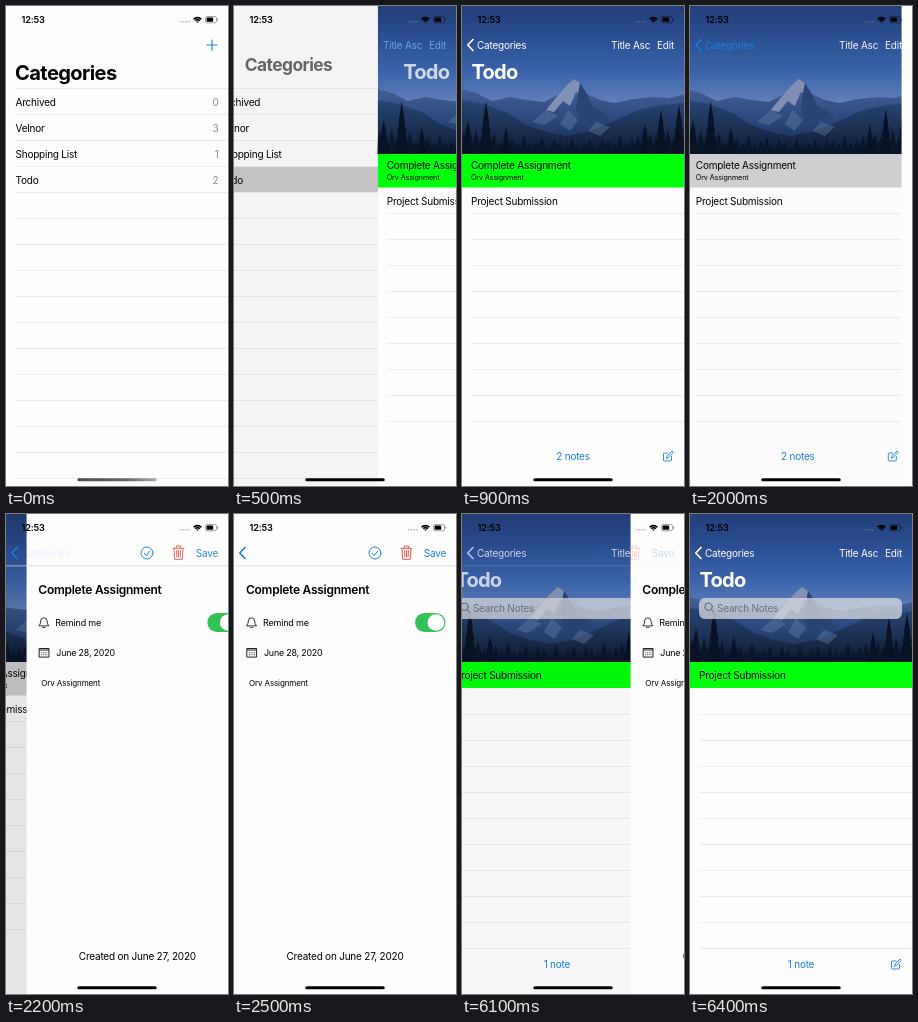
An HTML page with a canvas that plays this animation: 222 by 480 pixels, repeating every 8000 ms.

```html
<!DOCTYPE html>
<html lang="en">
<head>
<meta charset="utf-8">
<title>Notes app</title>
<style>
html, body { margin: 0; width: 100%; height: 100%; overflow: hidden; background: #fdfdfd; }
canvas { display: block; width: 222px; height: 480px; }
</style>
</head>
<body>
<canvas id="stage"></canvas>
<script>
const W = 222, H = 480, LOOP = 8000;
const BLUE = '#1a7ee0', PAPER = '#fdfdfd', LINE = '#ececee', GREEN = '#00ff0a';
const canvas = document.getElementById('stage');
const ctx = canvas.getContext('2d');
const ratio = window.devicePixelRatio || 1;
canvas.width = W * ratio;
canvas.height = H * ratio;
ctx.scale(ratio, ratio);

// Text is placed by the vertical centre of its capitals.
function text(str, x, y, { size = 10, weight = 400, color = '#000', align = 'left', track = -0.022 } = {}) {
  ctx.font = `${weight} ${size}px Inter, "Liberation Sans", sans-serif`;
  ctx.letterSpacing = `${size * track}px`;
  ctx.textAlign = align;
  ctx.fillStyle = color;
  ctx.fillText(str, x, y + size * 0.36);
}

function rect(x, y, w, h, color) {
  ctx.fillStyle = color;
  ctx.fillRect(x, y, w, h);
}

function pill(x, y, w, h, r, color) {
  ctx.fillStyle = color;
  ctx.beginPath();
  ctx.roundRect(x, y, w, h, r);
  ctx.fill();
}

function stroke(d, color, width = 1) {
  ctx.strokeStyle = color;
  ctx.lineWidth = width;
  ctx.lineCap = ctx.lineJoin = 'round';
  ctx.stroke(new Path2D(d));
}

function shape(d, color) {
  ctx.fillStyle = color;
  ctx.fill(new Path2D(d));
}

function verticalFade(y0, y1, ...stops) {
  const gradient = ctx.createLinearGradient(0, y0, 0, y1);
  stops.forEach((color, i) => gradient.addColorStop(i / (stops.length - 1), color));
  return gradient;
}

function faded(alpha, draw) {
  if (alpha <= 0) return;
  ctx.save();
  ctx.globalAlpha *= Math.min(1, alpha);
  draw();
  ctx.restore();
}

function shifted(x, draw) {
  ctx.save();
  ctx.translate(x, 0);
  ctx.beginPath();
  ctx.rect(0, 0, W, H);
  ctx.clip();
  draw();
  ctx.restore();
}

function rules(first, last) {
  for (let y = first; y <= last; y += 26) rect(9, y, W - 9, 1, LINE);
}

// Progress of a critically damped spring.
function spring(ms) {
  const k = 18.26 * Math.max(0, ms) / 1000;
  return 1 - (1 + k) * Math.exp(-k);
}

function statusBar() {
  text('12:53', 15.5, 14, { size: 9.2, weight: 600, track: -0.02 });
  for (let i = 0; i < 4; i++) rect(174 + i * 2.8, 15, 1.5, 1.5, 'rgba(130,130,130,.55)');
  for (const r of [1, 3.2, 5.4]) {
    ctx.beginPath();
    ctx.arc(191.5, 17, r, -Math.PI * 0.76, -Math.PI * 0.24);
    ctx.strokeStyle = '#000';
    ctx.lineWidth = 1.6;
    ctx.lineCap = 'butt';
    ctx.stroke();
  }
  ctx.beginPath();
  ctx.roundRect(199.5, 10.5, 11, 6.4, 1.8);
  ctx.strokeStyle = 'rgba(0,0,0,.45)';
  ctx.lineWidth = 0.8;
  ctx.stroke();
  pill(200.6, 11.6, 6.6, 4.2, 0.9, '#000');
  rect(211.4, 12.7, 0.9, 2, 'rgba(0,0,0,.45)');
}

function homeBar(soft) {
  let color = '#000';
  if (soft) {
    color = ctx.createLinearGradient(71, 0, 151, 0);
    color.addColorStop(0, '#4a4a4a');
    color.addColorStop(0.6, '#666');
    color.addColorStop(1, '#aaa');
  }
  pill(71.3, 472.2, 79.4, 3, 1.5, color);
}

function categoryBody(selected) {
  rect(0, 0, W, H, PAPER);
  if (selected) rect(0, 161, W, 26, '#cacacc');
  rules(82, 472);
  [['Archived', 0], ['Velnor', 3], ['Shopping List', 1], ['Todo', 2]].forEach(([name, count], i) => {
    const y = 96 + i * 26;
    text(name, 9.5, y);
    text(count, 212.5, y, { color: '#8e8e93', align: 'right' });
  });
}

function fir(x, top, width) {
  const h = 148 - top;
  for (let i = 0; i < 4; i++) {
    const y = top + h * i * 0.2, w = width * (0.4 + i * 0.2);
    shape(`M${x} ${y}L${x + w} ${y + h * 0.4}H${x - w}Z`, '#081325');
  }
}

function landscape() {
  rect(0, 0, W, 148, verticalFade(0, 100, '#223f78', '#2b4f93', '#3c64ab', '#6384bb'));
  shape('M0 83L14 87 30 95 48 91 64 94 82 96 96 89 104 80 112 73 119 77 125 88 138 94 152 97 172 93 192 91 208 92 222 88V148H0Z',
    verticalFade(75, 148, '#48659a', '#2c4a7e', '#152848'));
  shape('M112 73L118 77 123 92 114 86 108 100 101 95 92 106 84 104 97 88 105 79Z', '#7f91b5');
  shape('M118 77L125 88 130 99 143 107 152 121 132 113 120 120 114 102 116 88Z', '#2a4474');
  shape('M0 94L22 98 46 107 64 119 84 126 104 130 126 126 150 116 176 104 200 99 222 97V148H0Z',
    verticalFade(92, 148, '#294877', '#1c3256', '#0c192f'));
  shape('M84 104L96 110 82 119 70 116ZM106 104L116 114 108 125 98 118ZM134 116L148 121 138 130 126 125Z', 'rgba(104,128,168,.4)');
  for (let x = -4; x < W + 6; x += 6) {
    const valley = 10 * Math.sin(Math.PI * x / W);
    const top = 126 + valley + 5 * Math.sin(x * 1.7);
    shape(`M${x - 5} 148L${x} ${top} ${x + 5} 148Z`, '#0a162b');
  }
  for (const [x, top, width] of [[6, 114, 7], [24, 95, 8], [44, 122, 6], [183, 118, 6], [199, 103, 7], [217, 99, 8]])
    fir(x, top, width);
}

function composeIcon() {
  stroke('M206 447h-3.5q-1 0-1 1v6q0 1 1 1h6q1 0 1-1v-3.5M204.6 452l.5-2 5-5 1.3 1.3-5 5Z', BLUE, 0.9);
}

function noteBody({ single, selected }) {
  rect(0, 0, W, H, PAPER);
  landscape();
  if (single) {
    rect(0, 148, W, 26, GREEN);
    text('Project Submission', 9, 161);
    rules(200, 434);
  } else {
    rect(0, 148, W, 33.5, selected ? '#d0d0d2' : GREEN);
    text('Complete Assignment', 9, 159.5);
    text('Orv Assignment', 9, 171, { size: 7.1, track: -0.01 });
    text('Project Submission', 9, 195);
    rules(207, 415);
  }
  text(single ? '1 note' : '2 notes', 111, 450.5, { color: BLUE, align: 'center' });
  composeIcon();
}

function searchField() {
  pill(9, 84, 203, 21, 6, 'rgba(214,217,222,.76)');
  stroke('M22.2 92.7a3.7 3.7 0 1 0-7.4 0a3.7 3.7 0 1 0 7.4 0M21.2 95.5l2.8 2.8', '#59626e');
  text('Search Notes', 27, 94, { color: '#6a737f' });
}

function noteActions(color) {
  text('Title Asc', 149, 39, { color });
  text('Edit', 195, 39, { color });
}

function chevron(color) {
  stroke('M11 33.5L5.8 39l5.2 5.5', color, 1.7);
}

function backButton(color) {
  chevron(color);
  text('Categories', 15, 39, { color });
}

function noteTitle(x) {
  text('Todo', x, 66, { size: 20.1, weight: 700, color: '#fff', track: -0.04 });
}

function detailBody() {
  rect(0, 0, W, H, PAPER);
  text('Complete Assignment', 12, 76, { size: 12, weight: 600 });
  stroke('M12.8 111.6q1.5-1.4 1.5-4.6a3.2 3.2 0 0 1 6.4 0q0 3.2 1.5 4.6ZM16 113.3q1.5 1.2 3 0', '#222', 0.9);
  text('Remind me', 29, 109, { size: 9 });
  pill(181, 99, 30.5, 19, 9.5, '#34c256');
  pill(193.5, 100.2, 16.8, 16.6, 8.3, '#fff');
  stroke('M13.2 134.5h9.4v8.6h-9.4ZM13.2 136h9.4', '#222', 1);
  for (let i = 0; i < 8; i++) rect(15 + (i % 4) * 1.7, 138.3 + Math.floor(i / 4) * 2, 0.9, 0.9, '#333');
  text('June 28, 2020', 30, 139, { size: 8.9 });
  text('Orv Assignment', 15, 169, { size: 8, track: -0.015 });
  text('Created on June 27, 2020', 111, 442, { align: 'center' });
}

function detailActions(pressed) {
  rect(0, 51.5, W, 0.8, '#d4d4d6');
  chevron(BLUE);
  faded(pressed ? 0.25 : 1, () =>
    stroke('M147 39a6 6 0 1 0-12 0a6 6 0 1 0 12 0M138.2 39.3l2 2.2 3.6-4.6', BLUE, 1));
  stroke('M167 34.3h11M170.3 34v-2h4.4v2M168 34.5l.7 10.8h7.6l.7-10.8M170.6 36.7l.2 6.2M172.5 36.7v6.2M174.4 36.7l-.2 6.2', '#e2574c', 1);
  text('Save', 212, 39, { color: BLUE, align: 'right' });
}

// Two screens on a navigation stack; p runs from the lower to the upper one.
function stack(p, lower, upper) {
  shifted(-0.3 * W * p, lower);
  rect(0, 0, W, H, `rgba(0,0,0,${0.1 * p})`);
  shifted(W * (1 - p), upper);
}

function largeTitle(x, y, size) {
  text('Categories', x, y, { size, weight: 700, track: -0.03 });
}

function categoriesScene() {
  categoryBody(false);
  largeTitle(9, 66.5, 20.1);
  stroke('M206 34v10M201 39h10', BLUE, 1.1);
}

function openCategory(p) {
  stack(p, () => categoryBody(true), () => noteBody({}));
  const q = p ** 1.25;
  const x = 9 + 6 * q, y = 66.5 - 27.5 * q, size = 20.1 - 10.1 * q;
  faded((1 - p) ** 1.2, () => largeTitle(x, y, size));
  faded(2 * p - 1, () => {
    chevron('#fff');
    text('Categories', x, y, { size, color: '#fff' });
  });
  faded(1 - p, () => noteActions(BLUE));
  faded(p, () => noteActions('#fff'));
  faded(0.4 + p, () => noteTitle(10 + 246 * (1 - p)));
}

function noteScene(single) {
  noteBody({ single });
  backButton('#fff');
  noteActions('#fff');
  noteTitle(9.5);
  if (single) searchField();
}

function openNote(p) {
  stack(p, () => noteBody({ selected: true }), detailBody);
  faded(1 - p, () => {
    backButton(BLUE);
    noteActions('#fff');
  });
  faded(p, () => detailActions(false));
}

function closeNote(p) {
  stack(1 - p, () => {
    noteBody({ single: true });
    searchField();
    faded(p, () => noteTitle(9.5));
  }, detailBody);
  faded(p, () => {
    backButton('#fff');
    noteActions('#fff');
  });
  faded(1 - p, () => detailActions(false));
}

function detailScene(pressed) {
  detailBody();
  detailActions(pressed);
}

function render(ms) {
  const t = Math.floor(ms / 100) * 100;
  ctx.clearRect(0, 0, W, H);
  if (t < 500) categoriesScene();
  else if (t < 900) openCategory(spring(t - 432));
  else if (t < 2000) noteScene(false);
  else if (t < 2500) openNote(spring(t - 1981));
  else if (t < 6000) detailScene(t >= 5800);
  else if (t < 6400) closeNote(spring(t - 5950));
  else noteScene(true);
  statusBar();
  homeBar(t < 500);
}

const start = performance.now();
function frame() {
  render((performance.now() - start) % LOOP);
  requestAnimationFrame(frame);
}
frame();
</script>
</body>
</html>
```
